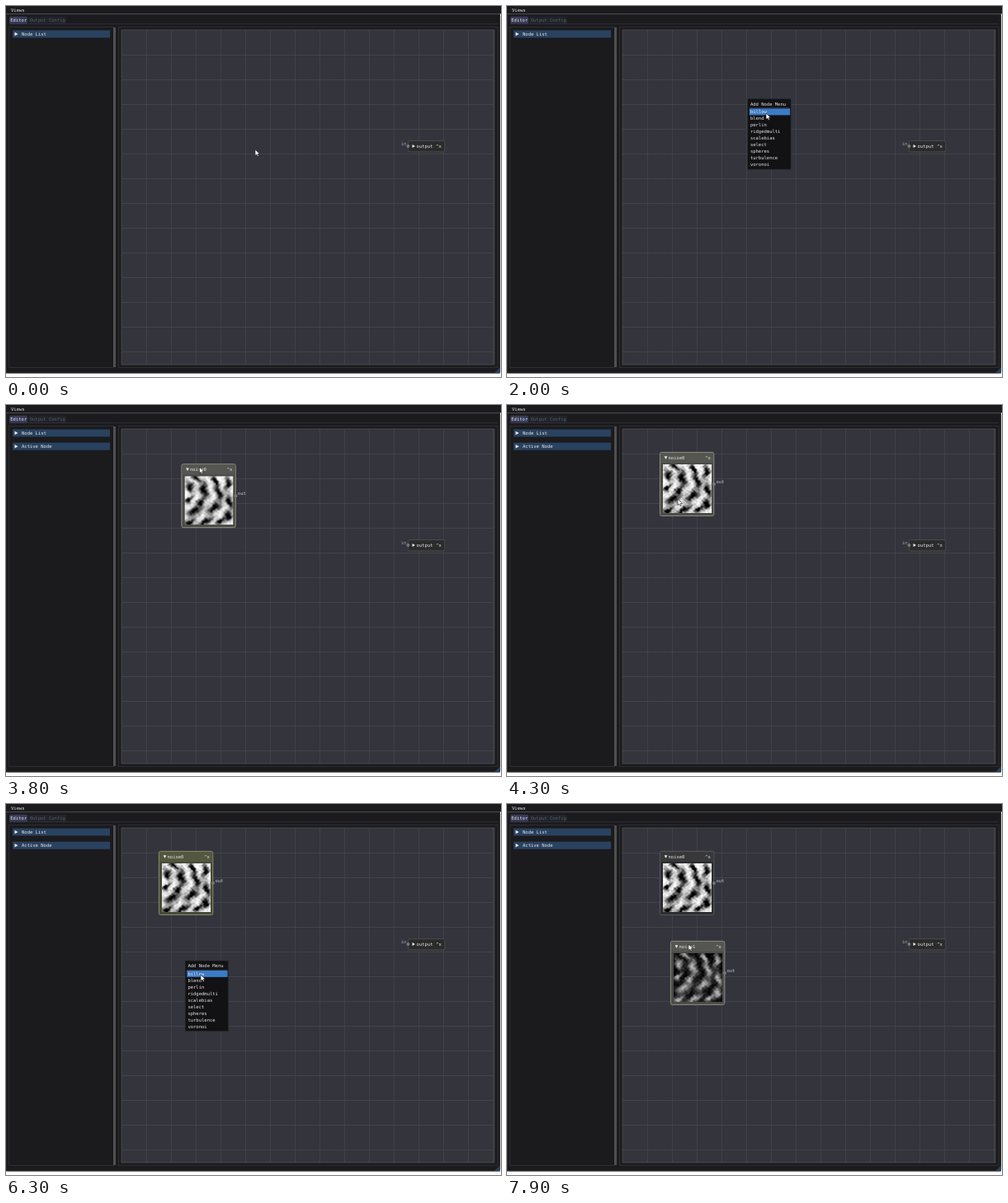
An HTML page with a canvas that plays this animation: 600x450 px, repeating every 8000 ms.

```html
<!DOCTYPE html>
<html lang="en">
<head>
<meta charset="utf-8">
<title>Noise node editor</title>
<style>
  html, body { margin: 0; width: 100%; height: 100%; overflow: hidden; background: #fff; }
  #stage { position: relative; width: 600px; height: 450px; overflow: hidden; }
  svg { position: absolute; left: 0; top: 0; width: 600px; height: 450px; overflow: visible; }
  text { font: 5.53px "DejaVu Sans Mono", monospace; fill: #e6e6e6; text-rendering: geometricPrecision; white-space: pre; }
  .node { position: absolute; left: 0; top: 0; width: 66px; height: 78px; }
  .node canvas { position: absolute; left: 4px; top: 15px; width: 59px; height: 59px; }
</style>
</head>
<body>
<div id="stage"></div>
<script>
const LOOP = 8000, STEP = 100;
const stage = document.getElementById('stage');

const rect = (x, y, w, h, fill, extra = '') =>
  `<rect x="${x}" y="${y}" width="${w}" height="${h}" fill="${fill}" ${extra}/>`;
const label = (x, y, text, fill = '#e6e6e6') =>
  `<text x="${x}" y="${y}" style="fill:${fill}">${text}</text>`;
const path = (d, fill, extra = '') => `<path d="${d}" fill="${fill}" ${extra}/>`;
const port = (x, y) => `<circle cx="${x}" cy="${y}" r="2" fill="#777779"/>`;

function addSvg(parent, markup) {
  parent.insertAdjacentHTML('beforeend', `<svg viewBox="0 0 600 450">${markup}</svg>`);
  return parent.lastElementChild;
}

// Editor window
function header(y, text) {
  return rect(8, y - 4.5, 118, 9, '#294260') +
    path(`M10.5 ${y - 2.3}l4 2.3l-4 2.3z`, '#eee') + label(19, y + 2, text);
}

function grid() {
  let d = '';
  for (let x = 170.4; x < 592; x += 30) d += `M${x} 29V435`;
  for (let y = 59.5; y < 435; y += 30) d += `M140 ${y}H592`;
  return path(d, 'none', 'stroke="#47484c" stroke-width=".8"');
}

const frame = (x, y, w, h) => rect(x, y, w, h, 'none', 'stroke="#37373b" stroke-width=".7"');

const base = addSvg(stage,
  rect(0, 0, 600, 9.5, '#1b1a1d') + label(6, 7, 'Views') +
  rect(0, 9.5, 599, 436, '#0e0e10') +
  rect(.4, 10, 598.4, 435, '#1b1a1d', 'rx="2" stroke="#38383c" stroke-width=".7"') +
  rect(4, 12.7, 22, 9, '#373a56', 'rx="1.5"') + label(5.3, 19.4, 'Editor') +
  rect(27, 12.7, 46, 9, '#202329', 'rx="1.5"') + label(28.7, 19.4, 'Output Config', '#5d5f63') +
  rect(4, 21.5, 592, .7, '#35384d') +
  frame(3.8, 25.5, 126.5, 413) + rect(130, 26, 3, 412, '#505052') +
  frame(136.5, 25.5, 459.5, 413) +
  rect(140, 29, 452, 406, '#33343c') + grid() +
  rect(140, 29, 452, 406, 'none', 'stroke="#55565a" stroke-width=".7"') +
  path('M598.8 438.5V445H592z', '#25435f') +
  header(34, 'Node List') + `<g class="active">${header(50.2, 'Active Node')}</g>` +
  rect(487.4, 163.6, 44.4, 13.3, '#2b2b2c', 'rx="2" stroke="#58585a" stroke-width=".7"') +
  port(487.4, 170) + label(478.7, 169, 'in', '#a5a5a7') +
  path('M492.5 168l3.4 2l-3.4 2z', '#eee') + label(497.6, 172, 'output') + label(521.3, 172, '^x'));
const activeHeader = base.querySelector('.active');

// Soft tilted blobs shared by both previews: x, y, half length, half width, degrees
const blobs = [
  [23, 17, 10, 5, 80], [6, 12, 7, 4, 60], [41, 20, 9, 4, 75], [52, 9, 8, 3.5, 100],
  [12, 42, 9, 5, -30], [35, 38, 8, 5, -35], [25, 55, 9, 4, -35], [52, 48, 8, 4, -60],
  [6, 56, 6, 4, -20], [36, 5, 6, 3, 70], [54, 30, 7, 4, 80], [19, 31, 5, 3, -40],
  [42, 54, 5, 3, -50], [14, 2, 5, 3, 30], [5, 28, 5, 3, -50]
];

function blobField(x, y) {
  const wx = x + 1.2 * Math.sin(y * .45 + 1) + .5 * Math.sin(x * .9 + y * 1.1);
  const wy = y + 1.2 * Math.sin(x * .5 + 2) + .5 * Math.cos(x * 1.1 - y * .9);
  let sum = 0;
  for (const [cx, cy, long, short, degrees] of blobs) {
    const a = degrees * Math.PI / 180, dx = wx - cx, dy = wy - cy;
    const u = (dx * Math.cos(a) + dy * Math.sin(a)) / long;
    const v = (dy * Math.cos(a) - dx * Math.sin(a)) / short;
    sum += Math.exp(-.9 * (u * u + v * v));
  }
  const cloud = .08 * Math.sin(x * .9 + 2 * Math.sin(y * .5)) * Math.cos(y * .8 + Math.sin(x * .6));
  return Math.min(1, Math.max(0, sum + cloud));
}

function paint(canvas, shade) {
  const size = canvas.width = canvas.height = 59;
  const ctx = canvas.getContext('2d');
  const image = ctx.createImageData(size, size);
  for (let i = 0; i < size * size; i++) {
    const value = 255 * shade(blobField(i % size, Math.floor(i / size)));
    image.data.set([value, value, value, 255], i * 4);
  }
  ctx.putImageData(image, 0, 0);
}

// Nodes
function makeNode(name, shade) {
  const el = document.createElement('div');
  el.className = 'node';
  stage.append(el);
  const svg = addSvg(el,
    rect(.4, .4, 65.4, 77, '#333', 'class="body" rx="2" stroke-width="1"') +
    path('M1 13V2.5Q1 1 2.5 1H63.7Q65.2 1 65.2 2.5V13z', '#444', 'class="title"') +
    path('M5.6 5.2h3.8l-1.9 3.5z', '#eee') + label(10.5, 8.8, name) + label(55.2, 8.8, '^x') +
    port(66, 39) + label(68.4, 38.2, 'out', '#c4c4c6'));
  const canvas = document.createElement('canvas');
  el.append(canvas);
  paint(canvas, shade);
  return { el, body: svg.querySelector('.body'), title: svg.querySelector('.title') };
}

const nodes = [
  { ...makeNode('noise0', f => Math.max(0, 1 - f * 1.1)),
    home: [291, 112], born: 2900, grab: 3400, drop: 4000 },
  { ...makeNode('noise1', f => .7 * f),
    home: [216, 189], born: 6600, grab: 7400, drop: 8000 }
];
const GRIP = [22, 4];

// Popup menu
const items = ['billow', 'blend', 'perlin', 'ridgedmulti', 'scalebias', 'select', 'spheres', 'turbulence', 'voronoi'];
const menus = [
  { x: 291.7, y: 112.5, from: 1700, to: 2900 },
  { x: 217.2, y: 190, from: 4800, to: 6600 }
];
const overlay = addSvg(stage,
  `<g class="menu">${rect(0, 0, 52.4, 85.6, '#121214', 'stroke="#2c2c30" stroke-width=".6"')}` +
  rect(2, 11.9, 49.4, 8, '#3c7bc6', 'class="pick"') + rect(2, 10.8, 48.5, .5, '#47474c') +
  label(3.2, 8, 'Add Node Menu') + items.map((s, i) => label(3.2, 17.8 + i * 8, s)).join('') + '</g>' +
  `<g class="cursor">${path('M0 0V7.6L1.8 6L3 8.6L4.3 8L3.2 5.5H5.6z', '#fff', 'stroke="#111" stroke-width=".6"')}</g>`);
const menuEl = overlay.querySelector('.menu');
const pickEl = overlay.querySelector('.pick');
const cursorEl = overlay.querySelector('.cursor');

// Pointer route: time, x, y
const route = [
  [0, 302, 174], [1400, 291.7, 112.5], [1700, 291.7, 112.5], [2000, 314, 130], [2400, 314, 130],
  [2600, 314, 149.5], [2900, 314, 149.5], [3200, 312, 132], [3400, 313, 116], [4000, 207, 61],
  [4300, 207, 114], [4600, 217.2, 190], [4900, 217.2, 190], [5300, 230, 247], [5500, 232, 230.5],
  [6300, 236, 207], [6600, 236, 207], [7100, 236, 206], [7400, 238, 193], [7900, 220, 170], [8000, 220, 170]
];

function pointer(t) {
  const i = route.findIndex(k => k[0] > t);
  const [t0, x0, y0] = route[i - 1], [t1, x1, y1] = route[i];
  const p = (t - t0) / (t1 - t0), e = p * p * (3 - 2 * p);
  return [x0 + (x1 - x0) * e, y0 + (y1 - y0) * e];
}

const show = (el, on) => { el.style.visibility = on ? 'visible' : 'hidden'; };
const place = (el, x, y) => el.setAttribute('transform', `translate(${x} ${y})`);

function nodeColors(selected, hovered) {
  if (selected && hovered) return ['#4b4b49', '#555551', '#8f8f78'];
  if (selected) return ['#484a39', '#54573f', '#8b8d66'];
  if (hovered) return ['#4a4a4b', '#555557', '#747476'];
  return ['#2c2c2d', '#38383a', '#5a5a5c'];
}

function render(t) {
  const [cx, cy] = pointer(t);
  place(cursorEl, cx, cy);
  show(activeHeader, t >= nodes[0].grab);

  const menu = menus.find(m => t >= m.from && t < m.to);
  show(menuEl, menu);
  if (menu) {
    place(menuEl, menu.x, menu.y);
    const row = Math.floor((cy - menu.y - 11.9) / 8);
    pickEl.setAttribute('y', 11.9 + row * 8);
    pickEl.style.display = row >= 0 && row < items.length ? '' : 'none';
  }

  const chosen = nodes.filter(n => t >= n.grab).pop();
  for (const n of nodes) {
    show(n.el, t >= n.born);
    const hand = pointer(Math.min(t, n.drop - 1));
    const [x, y] = t < n.grab ? n.home : hand.map((v, i) => v - GRIP[i]);
    n.el.style.transform = `translate(${x}px, ${y}px)`;
    const hovered = !menu && cx >= x && cx < x + 66 && cy >= y && cy < y + 78;
    const [body, title, edge] = nodeColors(n === chosen, hovered);
    n.body.setAttribute('fill', body);
    n.body.setAttribute('stroke', edge);
    n.title.setAttribute('fill', title);
  }
}

function tick() {
  const t = performance.now() % LOOP;
  render(Math.floor(t / STEP) * STEP);
  requestAnimationFrame(tick);
}
tick();
</script>
</body>
</html>
```
